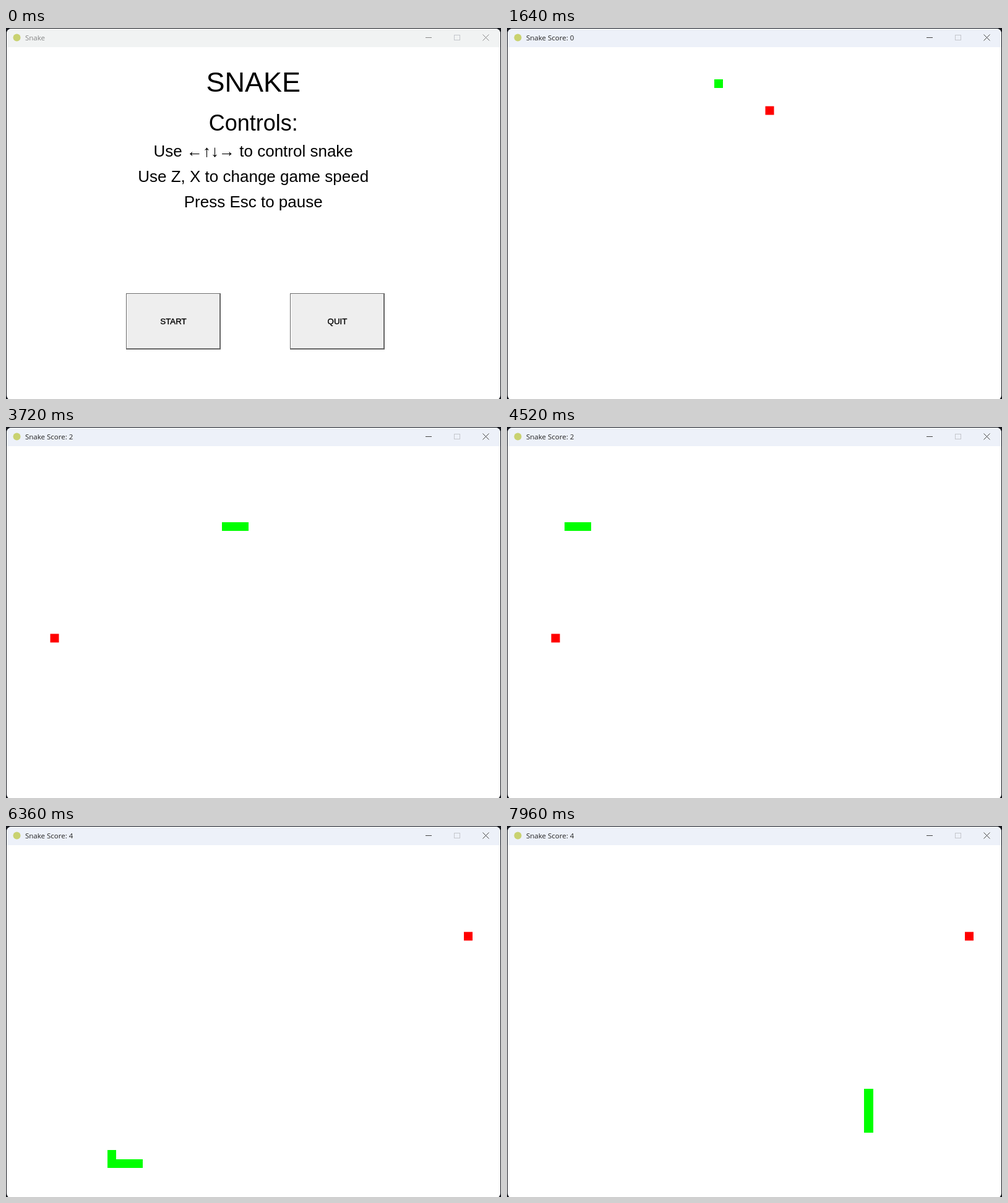
An HTML page with a canvas for the animation above (8 s loop, 800x600 px).

```html
<!DOCTYPE html>
<html lang="en">
<head>
<meta charset="utf-8">
<title>Snake</title>
<style>
  html, body { margin: 0; width: 100%; height: 100%; overflow: hidden; background: #14161c; }
  canvas { display: block; }
</style>
</head>
<body>
<canvas id="stage" width="800" height="600"></canvas>
<script>
const ctx = document.getElementById('stage').getContext('2d');

const LOOP = 8000, FOCUS = 60, GAME_START = 480;
const STEP = 46.8, STEP_ZERO = 1617.5;       // ms per move, time of move 0
const CELL = 14.25, LEFT = 64.25, TOP = 82.5;
const FIRST_COL = -3, COL_AT_ZERO = 19;

// Corners of the snake's route, in cells
const route = [[FIRST_COL, 0], [25, 0], [25, 15], [29, 15], [29, 5], [0, 5],
               [0, 23], [7, 23], [7, 32], [36, 32], [36, 0]];
// Each food with the move on which it is eaten
const foods = [
  { x: 417.5, y: 126.5, eaten: 9 },
  { x: 479.5, y: 277.5, eaten: 26 },
  { x: 71.5, y: 334.5, eaten: 76 },
  { x: 154, y: 420.7, eaten: 88 },
  { x: 740, y: 171.3, eaten: Infinity }
];

function cellAt(distance) {
  for (let i = 1; i < route.length; i++) {
    const [x0, y0] = route[i - 1], [x1, y1] = route[i];
    const length = Math.abs(x1 - x0) + Math.abs(y1 - y0);
    if (distance <= length) {
      const k = distance / length;
      return [x0 + (x1 - x0) * k, y0 + (y1 - y0) * k];
    }
    distance -= length;
  }
  return route[route.length - 1];
}

function rect(x, y, w, h, color) {
  ctx.fillStyle = color;
  ctx.fillRect(x, y, w, h);
}

function text(string, x, y, font, color = '#000', align = 'center') {
  ctx.font = font;
  ctx.fillStyle = color;
  ctx.textAlign = align;
  ctx.fillText(string, x, y);
}

function drawWindow(title, active) {
  rect(0, 0, 800, 600, '#14161c');
  ctx.save();
  ctx.beginPath();
  ctx.roundRect(1, 1, 798, 601, 8);
  ctx.clip();
  rect(0, 0, 800, 600, '#fff');
  rect(0, 0, 800, 31, active ? '#edf1f9' : '#f1f3f3');
  ctx.restore();

  ctx.fillStyle = '#c9d271';
  ctx.beginPath();
  ctx.arc(17.5, 15.5, 6, 0, 2 * Math.PI);
  ctx.fill();
  text(title, 31, 20, '11.5px "Open Sans", "Noto Sans", sans-serif', active ? '#222' : '#858585', 'left');

  ctx.lineWidth = 1;
  ctx.strokeStyle = '#c4c7cc';
  ctx.strokeRect(724.5, 11.5, 9, 8);
  ctx.strokeStyle = active ? '#444' : '#888';
  ctx.beginPath();
  ctx.moveTo(678, 15.5); ctx.lineTo(688, 15.5);
  ctx.moveTo(770.5, 10.5); ctx.lineTo(780.5, 20.5);
  ctx.moveTo(780.5, 10.5); ctx.lineTo(770.5, 20.5);
  ctx.stroke();
}

function drawButton(label, x) {
  rect(x, 429, 153, 91, '#666');
  rect(x + 1, 430, 150, 88, '#fff');
  rect(x + 2, 431, 149, 87, '#eee');
  text(label, x + 76.5, 478.5, '13.3px "Liberation Sans", Arial, sans-serif');
  ctx.lineWidth = 0.35;
  ctx.strokeStyle = '#000';
  ctx.strokeText(label, x + 76.5, 478.5);
}

function drawMenu() {
  const line = (string, y, size) => text(string, 399.7, y, size + 'px "Liberation Sans", Arial, sans-serif');
  line('SNAKE', 103, 45);
  line('Controls:', 166, 36);
  line('Use ←↑↓→ to control snake', 208, 26);
  line('Use Z, X to change game speed', 249, 26);
  line('Press Esc to pause', 290, 26);
  drawButton('START', 194);
  drawButton('QUIT', 459);
}

function drawSnake(move, length) {
  const head = Math.max(0, move + COL_AT_ZERO - FIRST_COL);
  for (let i = 0; i < length; i++) {
    const [col, row] = cellAt(Math.max(0, head - i));
    const x = Math.round(LEFT + col * CELL), y = Math.round(TOP + row * CELL);
    const right = Math.round(LEFT + (col + 1) * CELL), bottom = Math.round(TOP + (row + 1) * CELL);
    rect(x, y, right - x, bottom - y, '#0f0');
  }
}

function draw(now) {
  const t = now % LOOP;
  if (t < GAME_START) {
    drawWindow('Snake', t >= FOCUS);
    drawMenu();
  } else {
    const move = Math.floor((t - STEP_ZERO) / STEP);
    const score = foods.filter(food => move >= food.eaten).length;
    drawWindow('Snake Score: ' + score, true);
    rect(foods[score].x, foods[score].y, 14, 14, '#f00');
    drawSnake(move, score + 1);
  }
  requestAnimationFrame(draw);
}
requestAnimationFrame(draw);
</script>
</body>
</html>
```
